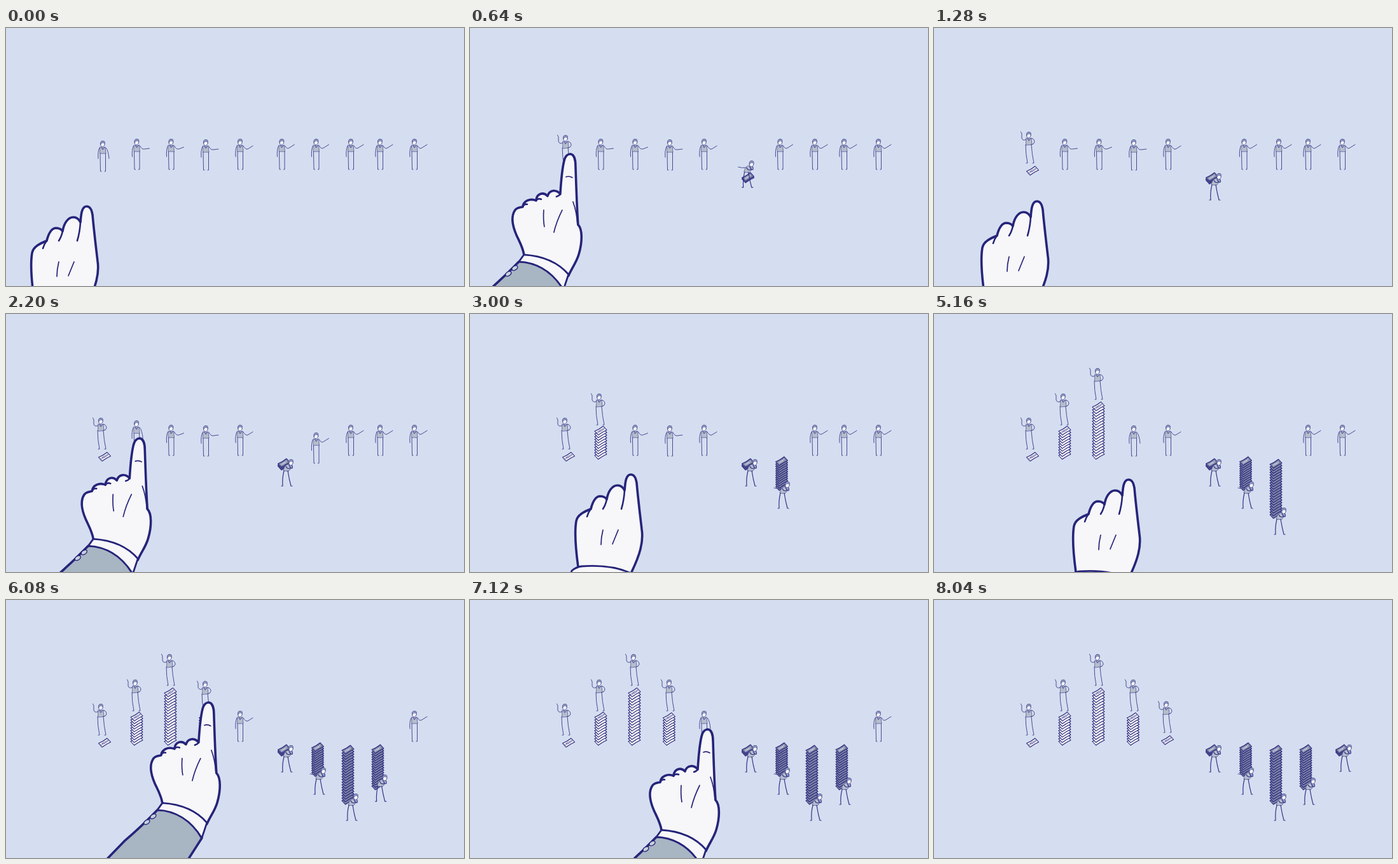
Recreate the animation shown at these times as an HTML page with a canvas. Size 720 by 405 pixels, loop 8640 ms.

```html
<!DOCTYPE html>
<html lang="en">
<head>
<meta charset="utf-8">
<title>Credit and debt</title>
<style>
  html, body { margin: 0; width: 100%; height: 100%; overflow: hidden; background: #d5def0; }
  canvas { display: block; width: 720px; height: 405px; }
</style>
</head>
<body>
<canvas id="stage" width="720" height="405"></canvas>
<script>
const ctx = document.getElementById('stage').getContext('2d');
const LOOP = 8640, STEP = 40, PERIOD = 1760, MOVE = 580;
const INK = '#26247a', THIN = '#484b93', PAPER = '#f7f7f9', GREY = '#b5bdca', SLEEVE = '#a8b5c3';
const P = d => new Path2D(d);

// x, y: resting head; tx, ty: final head; sx, top, bottom, n: pile of notes; arm: height of the held-out hand
const lenders = [
  { x: 152, y: 182, tx: 149, ty: 168, sx: 155, top: 224, bottom: 224, n: 1, arm: 9 },
  { x: 205.5, y: 179, tx: 203, ty: 130, sx: 205.5, top: 183, bottom: 221, n: 10, arm: 10 },
  { x: 259.5, y: 179, tx: 257, ty: 90, sx: 258.5, top: 145, bottom: 221, n: 18, arm: 8 },
  { x: 314, y: 180, tx: 313, ty: 130, sx: 313, top: 184, bottom: 221, n: 10, arm: 10 },
  { x: 368, y: 179, tx: 365, ty: 164, sx: 367, top: 220, bottom: 220, n: 1, arm: 6 }
];
const debtors = [
  { x: 433.5, y: 179, tx: 448, ty: 233, sx: 437, top: 234, bottom: 238, n: 3, reach: 1 },
  { x: 487.5, y: 179, tx: 499, ty: 268, sx: 490, top: 231, bottom: 270, n: 12, reach: 1 },
  { x: 542, y: 179, tx: 550, ty: 309, sx: 537.5, top: 235, bottom: 314, n: 20 },
  { x: 588, y: 179, tx: 596, ty: 284, sx: 584.5, top: 234, bottom: 291, n: 16 },
  { x: 642, y: 179, tx: 653, ty: 232, sx: 641, top: 234, bottom: 238, n: 3 }
];

const poses = {
  stand: {
    torso: P('M-4 5Q0 7 4 5L5 15H-4Z'),
    lines: P('M-4 15L-3.5 43H-2M4.5 15L4.5 43H3M-5 6Q-8 12 -7 23M-2 5L0 9L3 5')
  },
  raised: {
    torso: P('M-4 5Q0 7 4 5L5 15L-4 16Z'),
    lines: P('M-5 15Q-5 30 -2 44H-4M4 15Q5 30 8 44H6M-4 7Q-9 10 -11 5L-11 -2L-12.5 -5M4 5Q9 6 9 11Q8 15 4 15M-2 5L0 9L3 5')
  },
  bent: {
    torso: P('M-3 3Q-10 2 -12 13L-4 14Q1 10 0 5Z'),
    lines: P('M-11 13Q-14 25 -13 37H-15M-5 13Q-3 26 0 37H2M-3 4Q-1 10 2 9Q3 7 1 3M-8 6Q-6 11 -1 9')
  }
};
const idleArm = P('M5 6Q9 10 10 23');
const reachArm = P('M-10 6Q-15 7 -21 5');
const hair = P('M-3.5 1Q-4.5 -4.5 0 -4.7Q4.5 -4.5 3 -1Q0 -3 -2 -1Z');
const note = P('M-9.5 1Q-2 -2 4 -7L9.5 -1Q3 2 -4 7Z');

const fist = {
  x: 127, y: 279,
  outline: P('M44 424C40 395 38 370 41 352C43 342 54 337 64 333C66 325 70 314 78 313C83 313 87 315 89 318C91 306 97 296 106 296C112 296 115 300 117 304C118 295 118 279 127 279C133 279 135 286 136 292C138 315 141 340 144 365C147 385 141 405 128 432'),
  creases: P('M64 333Q60 338 58 345M89 318Q87 327 83 333M117 304Q116 320 112 333'),
  lines: P('M83 366Q80 378 80 389M107 366L98 388'),
  cuff: P('M34 430Q41 424 50 423Q95 420 125 433L112 470H20Z')
};
const point = {
  x: 264, y: 187,
  outline: P('M192 345C190 333 185 325 180 314C174 300 171 285 178 275C181 271 186 271 190 270C191 261 201 256 211 260C212 249 222 246 229 253C232 243 243 242 249 250C250 235 251 215 255 198C257 189 262 187 265 187C271 188 273 197 273 205C274 235 275 270 277 298C284 305 284 325 278 345C274 358 267 366 262 378'),
  creases: P('M190 270Q192 265 197 266M211 260Q214 256 219 258M249 250Q247 253 243 254'),
  lines: P('M223 275Q222 290 224 301M252 275Q243 293 239 310M258 223Q263 221 268 224M269 262Q275 278 276 298'),
  cuff: P('M192 345Q238 348 262 376L254 400Q228 358 184 356Z'),
  sleeve: P('M184 356Q228 352 254 400L190 500H40L132 405Q160 381 184 356Z'),
  buttons: P('M163 377a5 3 -35 1 0 9 -4a5 3 -35 1 0 -9 4M173 368a5 3 -35 1 0 9 -4a5 3 -35 1 0 -9 4')
};

// time, fingertip x, fingertip y
const route = [
  [0, 127, 280], [200, 146, 244], [400, 156, 206], [880, 156, 197], [960, 156, 202],
  [1280, 162, 272], [1640, 190, 264], [1840, 204, 238], [2060, 209, 204], [2300, 209, 190],
  [2560, 209, 169], [2680, 210, 176], [3000, 253, 252], [3400, 252, 260], [3620, 257, 232],
  [3800, 262, 203], [3960, 263, 188], [4260, 264, 148], [4440, 265, 176], [4740, 288, 256],
  [5160, 306, 260], [5360, 313, 234], [5560, 318, 204], [5760, 318, 194], [6040, 318, 162],
  [6180, 319, 170], [6480, 340, 256], [6860, 360, 256], [7120, 373, 203], [7360, 373, 196],
  [7560, 373, 190], [7900, 366, 425]
];
// Times at which the hand swaps between fist and pointing drawing
const swaps = [160, 1080, 1820, 2840, 3580, 4600, 5340, 6360, 7090];

const mix = (a, b, p) => a + (b - a) * p;
const ease = p => (1 - Math.cos(Math.PI * Math.min(1, Math.max(0, p)))) / 2;

function slope(i, c) {
  const a = route[Math.max(0, i - 1)], b = route[Math.min(route.length - 1, i + 1)];
  return (b[c] - a[c]) / (b[0] - a[0]);
}

function fingertip(t) {
  const i = route.findIndex((k, n) => n + 1 < route.length && t < route[n + 1][0]);
  if (i < 0) return null;
  const a = route[i], b = route[i + 1], d = b[0] - a[0], u = (t - a[0]) / d;
  return [1, 2].map(c => {
    const h = u * u * (3 - 2 * u);
    return mix(a[c], b[c], h) + d * u * (1 - u) * ((1 - u) * slope(i, c) - u * slope(i + 1, c));
  });
}

function paint(path, fill, stroke, width) {
  ctx.lineWidth = width;
  if (fill) { ctx.fillStyle = fill; ctx.fill(path); }
  if (stroke) { ctx.strokeStyle = stroke; ctx.stroke(path); }
}

function at(x, y, draw) {
  ctx.save();
  ctx.translate(x, y);
  draw();
  ctx.restore();
}

function person(x, y, name, armPath) {
  const pose = poses[name], width = name === 'bent' ? 1.2 : 1;
  at(x, y, () => {
    paint(pose.torso, GREY, THIN, .7);
    paint(pose.lines, null, name === 'bent' ? '#33348a' : THIN, width);
    if (armPath) paint(armPath, null, THIN, 1);
    const head = new Path2D();
    head.ellipse(0, 0, 3.3, 4.5, .1, 0, 7);
    paint(head, PAPER, THIN, .9);
    paint(hair, '#929bbd', THIN, .7);
  });
}

function pile(p, s, growsDown, word, fill, textFill) {
  const shown = Math.ceil(s.n * p), gap = s.n > 1 ? (s.bottom - s.top) / (s.n - 1) : 0;
  const first = growsDown ? 0 : s.n - shown;
  for (let i = first + shown - 1; i >= first; i--) {
    at(s.sx, s.top + i * gap, () => {
      paint(note, fill, INK, 1.1);
      if (i > first) return;
      ctx.rotate(-.52);
      ctx.fillStyle = textFill;
      ctx.fillText(word, 0, .3);
    });
  }
}

function hand(t) {
  const tip = fingertip(t);
  if (!tip) return;
  const h = swaps.filter(s => t >= s).length % 2 ? point : fist;
  at(tip[0] - h.x, tip[1] - h.y, () => {
    if (h.sleeve) paint(h.sleeve, SLEEVE, INK, 3.6);
    paint(h.outline, PAPER, INK, 3.6);
    paint(h.cuff, PAPER, INK, 2.8);
    paint(h.creases, null, INK, 2.6);
    paint(h.lines, null, INK, 1.7);
    if (h.buttons) paint(h.buttons, '#c7d0da', INK, 1.3);
  });
}

function render(t) {
  ctx.fillStyle = '#d5def0';
  ctx.fillRect(0, 0, 720, 405);
  ctx.lineCap = ctx.lineJoin = 'round';
  ctx.font = 'bold 4px "Liberation Sans", sans-serif';
  ctx.textAlign = 'center';
  ctx.textBaseline = 'middle';
  for (let k = 0; k < 5; k++) {
    const start = 300 + PERIOD * k, p = ease((t - start) / MOVE);
    const a = lenders[k], b = debtors[k];
    const place = s => [mix(s.x, s.tx, p), mix(s.y, s.ty, p)];

    if (p > .3) pile(p, a, false, 'CREDIT', PAPER, INK);
    const idle = t >= start - 460;
    const held = P(`M5 6Q8 12 12 11L20 ${a.arm}`);
    if (p > .5) person(...place(a), 'raised');
    else person(mix(a.x, a.tx, p), mix(a.y, a.ty, p), 'stand', idle ? idleArm : held);

    if (p > .3) {
      pile(p, b, true, 'DEBT', '#7d83a6', PAPER);
      person(...place(b), 'bent', b.reach && reachArm);
    } else {
      person(b.x, place(b)[1], 'stand', P('M5 6Q8 12 12 9L20 4'));
    }
  }
  hand(t);
}

const began = performance.now();
function tick() {
  const t = (performance.now() - began) % LOOP;
  render(Math.floor(t / STEP) * STEP);
  requestAnimationFrame(tick);
}
tick();
</script>
</body>
</html>
```
